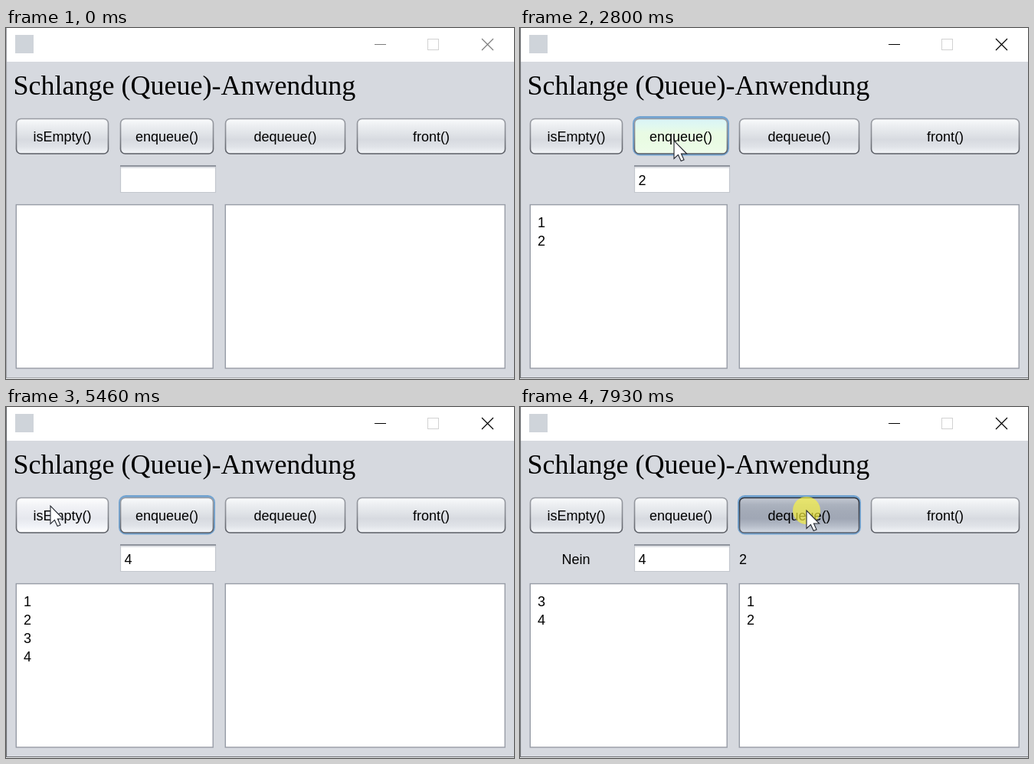
An HTML page that plays this animation: 663 px wide and 458 px high, repeating every 8 s.

```html
<!DOCTYPE html>
<html lang="de">
<head>
<meta charset="utf-8">
<title>Schlange (Queue)-Anwendung</title>
<style>
html, body { margin: 0; width: 100%; height: 100%; overflow: hidden; background: #d6d9df; }
svg { display: block; width: 663px; height: 458px; }
text { font: 18px "Liberation Sans", Arial, sans-serif; fill: #000; white-space: pre; }
.title { font: 36px "Liberation Serif", "Times New Roman", serif; }
.mid { text-anchor: middle; }
.ring { fill: none; stroke: #73a4d1; stroke-width: 3; }
.ctl { fill: none; stroke-width: 1.2; }
</style>
</head>
<body>
<svg id="stage" viewBox="0 0 663 458"></svg>
<script>
const LOOP = 8000;
const stage = document.getElementById('stage');

function add(tag, attrs = {}, text = '', parent = stage) {
  const el = document.createElementNS('http://www.w3.org/2000/svg', tag);
  for (const key in attrs) el.setAttribute(key, attrs[key]);
  el.textContent = text;
  parent.append(el);
  return el;
}
const set = (el, key, value) => el.setAttribute(key, value);
const show = (el, on) => set(el, 'visibility', on ? 'visible' : 'hidden');
const rect = (x, y, width, height, fill, more) => add('rect', { x, y, width, height, fill, ...more });
const label = (x, y, text = '', cls = '') => add('text', { x, y, class: cls }, text);

const defs = add('defs');
function gradient(id, ...colors) {
  const g = add('linearGradient', { id, x1: 0, y1: 0, x2: 0, y2: 1 }, '', defs);
  colors.forEach((c, i) => add('stop', { offset: i / (colors.length - 1), 'stop-color': c }, '', g));
}
gradient('normal', '#fafbfc', '#eceef1', '#e2e5e9', '#d7dae0', '#e0e3e8', '#f3f5f8');
gradient('hover', '#ffffff', '#f3f4f7', '#ecedf2', '#e6e8ee', '#f0f2f7', '#ffffff');
gradient('pressed', '#c3c8d2', '#abb2be', '#a3aab7', '#a0a7b5', '#b5bcc8', '#d3d9e2');
gradient('flash', '#d9f3f7', '#e0f8f0', '#e9fbe4', '#e9fbe3', '#ebfce6', '#effbea');
gradient('edge', '#999ca3', '#84878e', '#5a5d64');
gradient('edgeDown', '#2f333c', '#454a54', '#5a606c');

// Window
rect(0, 0, 663, 458, '#d6d9df');
rect(0, 0, 663, 44, '#fff');
const frame = add('path', { d: 'M.5 0V456.5H663', class: 'ctl' });
rect(0, 457, 663, 1, '#eceef0');
rect(12, 9, 24, 24, '#cfd4da');
const controls = add('path', { d: 'M481 21.5H496M621 14L636 29M636 14L621 29', class: 'ctl' });
rect(550.5, 14.5, 14, 14, 'none', { stroke: '#d2d2d2' });
label(9.5, 87, 'Schlange (Queue)-Anwendung', 'title');

// Buttons and panels
function makeButton(x, right, text) {
  const w = right - x;
  const ring = rect(x - .5, 116.5, w + 1, 48.5, 'none', { rx: 8, class: 'ring' });
  const body = rect(x + .5, 118.5, w - 1, 45.5, 'url(#normal)', { rx: 6, 'stroke-width': 1.6 });
  label(x + w / 2, 148, text, 'mid');
  return { x, y: 118, w, h: 46, ring, body };
}
const targets = {
  empty: makeButton(13, 134, 'isEmpty()'),
  enqueue: makeButton(149, 271, 'enqueue()'),
  dequeue: makeButton(286, 443, 'dequeue()'),
  front: makeButton(458, 652, 'front()')
};
rect(149, 179, 125, 36, '#fff');
add('path', { d: 'M149.5 180V214.5H273.5V180', stroke: '#c3c7ce', class: 'ctl' });
rect(149, 179, 125, 2, '#8f949d');
rect(150, 181, 123, 2, '#dfe1e5');
targets.field = {
  x: 149, y: 180, w: 125, h: 35,
  ring: rect(148.5, 178.5, 125.5, 37, 'none', { class: 'ring', rx: 1 })
};
const panels = [[13, 257.5], [286, 365.5]].map(([x, w]) => {
  rect(x + .3, 230.6, w - .6, 213.4, '#fff', { stroke: '#979ca6', 'stroke-width': 1.4 });
  const rows = [0, 1, 2, 3].map(i => label(x + 10, 260 + 24 * i));
  return { x, y: 230, w, h: 214, rows };
});
const answer = label(73, 205, '', 'mid');
const entry = label(154.5, 205);
const removed = label(286, 205);
const caret = rect(164.5, 186, 1.2, 24, '#000');

// Pointer
const pointer = add('g');
const glow = add('circle', { r: 18, fill: '#fff83c', opacity: .65 }, '', pointer);
const arrow = add('path', {
  d: 'M0 0V23.5L5.4 18.4L9.2 26.6L13 24.9L9.4 17H16.6Z',
  fill: '#fff', stroke: '#23272f', 'stroke-width': 1.1
}, '', pointer);
const beam = add('path', {
  d: 'M-6-12H-2Q0-12 0-10Q0-12 2-12H6M0-10V10M-6 12H-2Q0 12 0 10Q0 12 2 12H6',
  fill: 'none', stroke: '#000', 'stroke-width': 1.6
}, '', pointer);

// start, end, target
const clicks = [
  [680, 760, 'field'], [1470, 1610, 'enqueue'],
  [2100, 2160, 'field'], [2560, 2640, 'enqueue'],
  [3120, 3200, 'field'], [3730, 3810, 'enqueue'],
  [4200, 4280, 'field'], [4910, 4990, 'enqueue'],
  [5610, 5690, 'empty'], [6690, 6830, 'dequeue'],
  [7320, 7460, 'dequeue'], [7930, 8001, 'dequeue']
];
const typing = [840, 2250, 3270, 4370];
// first step, last step, step count, destination
const moves = [
  [200, 600, 6, 186, 198], [1000, 1310, 5, 201, 147],
  [1930, 2010, 2, 184, 200], [2330, 2480, 3, 201, 147],
  [2890, 2950, 2, 186, 199], [3350, 3580, 4, 201, 147],
  [3890, 4050, 3, 188, 199], [4450, 4610, 3, 201, 147],
  [5230, 5460, 4, 58, 129], [6150, 6370, 4, 374, 135]
];

const typedAt = t => typing.filter(at => at <= t).length;
const inside = (b, x, y) => x >= b.x && x <= b.x + b.w && y >= b.y && y <= b.y + b.h;

function pointerAt(t) {
  let x = 250, y = 475;
  for (const [from, to, steps, toX, toY] of moves) {
    if (t < from) break;
    const step = Math.floor((t - from) / (to - from) * (steps - 1) + 1e-6) + 1;
    const k = Math.min(1, step / steps);
    x += (toX - x) * k;
    y += (toY - y) * k;
  }
  return [x, y];
}

function render(t) {
  const active = t >= 120;
  const [x, y] = pointerAt(t);
  const queue = [], taken = [];
  let focus = '', down = '', reply = '';
  for (const [from, to, target] of clicks) {
    if (t < from) break;
    focus = target;
    if (t < to) { down = target; break; }
    if (target === 'enqueue') queue.push(typedAt(to));
    if (target === 'dequeue') taken.push(queue.shift());
    if (target === 'empty') reply = 'Nein';
  }

  set(frame, 'stroke', active ? '#6c6e72' : '#a3a5a9');
  set(controls, 'stroke', active ? '#000' : '#7d7d7d');
  for (const name in targets) {
    const item = targets[name];
    show(item.ring, focus === name);
    if (!item.body) continue;
    let look = inside(item, x, y) ? 'hover' : 'normal';
    if (down === name) look = 'pressed';
    else if (name === 'enqueue' && t >= 2800 && t < 2890) look = 'flash';
    set(item.body, 'fill', `url(#${look})`);
    set(item.body, 'stroke', look === 'pressed' ? 'url(#edgeDown)' : 'url(#edge)');
  }

  const typed = typedAt(t);
  entry.textContent = typed || '';
  show(caret, focus === 'field');
  set(caret, 'x', typed ? 164.5 : 154.5);
  answer.textContent = reply;
  removed.textContent = taken.at(-1) ?? '';
  [queue, taken].forEach((items, p) =>
    panels[p].rows.forEach((row, i) => { row.textContent = items[i] ?? ''; }));

  const overText = [targets.field, ...panels].some(b => inside(b, x, y));
  set(pointer, 'transform', `translate(${x} ${y})`);
  show(glow, down);
  show(beam, overText);
  show(arrow, !overText);
}

function tick() {
  render(performance.now() % LOOP);
  requestAnimationFrame(tick);
}
tick();
</script>
</body>
</html>
```
